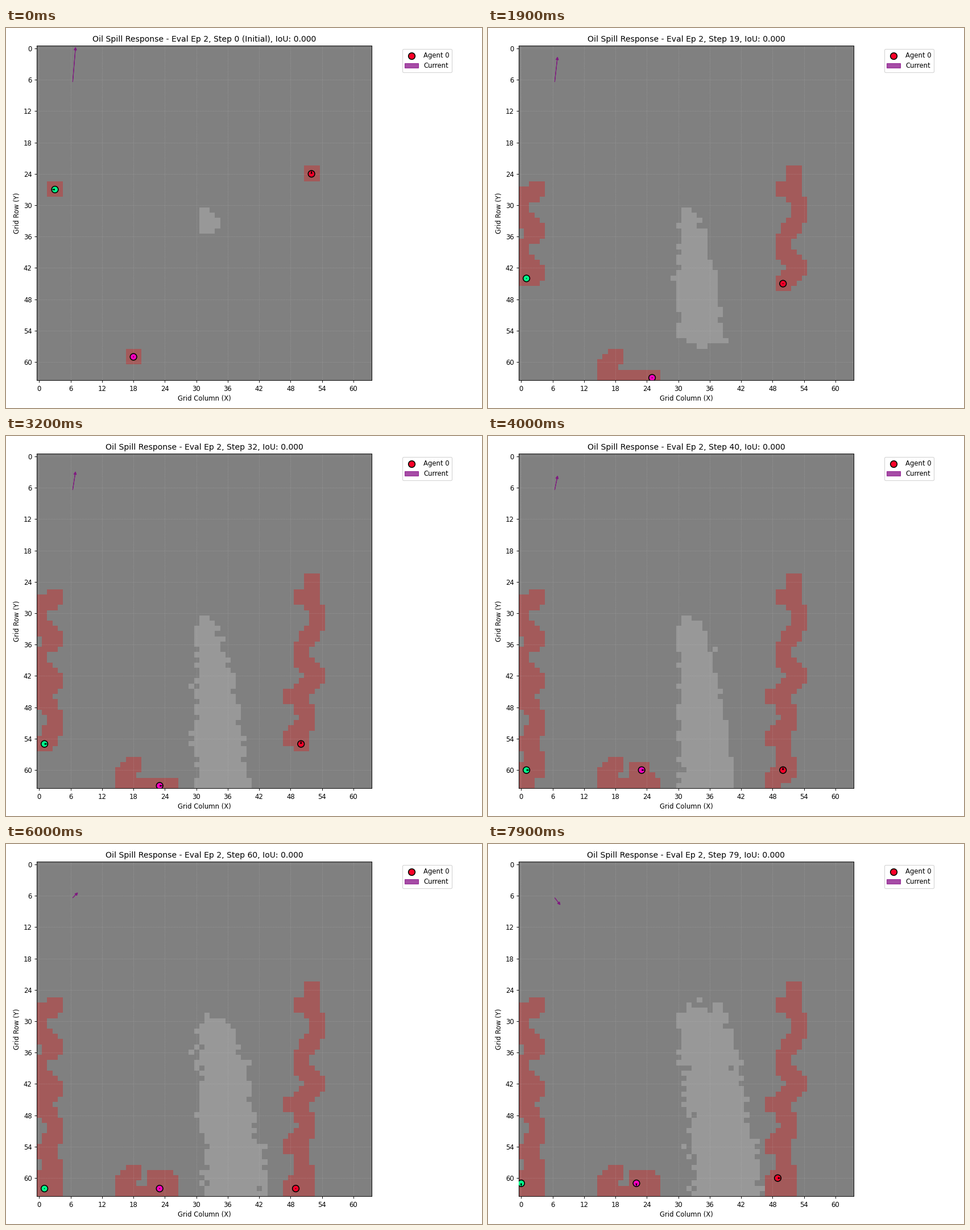
Recreate the animation shown at these times as a matplotlib script. Size 837 by 669 pixels, loop 8000 ms.

```python
import numpy as np
import matplotlib.pyplot as plt
from matplotlib.animation import FuncAnimation
from matplotlib.patches import Patch

W, H = 837, 669
DPI = W / 10
N, STEPS = 64, 80
LEFT, TOP, SIDE = 53.8, 31.2, 589.2
WATER, OIL, SEEN = (128,) * 3, (152,) * 3, (163, 90, 90)

# Turning points (step, column, row) of each agent's zigzag search
RED = [(0, 52, 24), (3, 52, 27), (5, 50, 27), (7, 53, 30), (9, 53, 32),
       (12, 50, 37), (13, 50, 39), (16, 53, 42), (19, 50, 45), (23, 48, 46),
       (25, 51, 49), (27, 51, 51), (30, 48, 54), (32, 50, 55), (36, 51, 60),
       (38, 48, 62), (40, 50, 60), (43, 51, 62)]
GREEN = [(0, 3, 27), (3, 0, 29), (6, 0, 32), (9, 3, 35), (11, 0, 38),
         (13, 0, 40), (16, 3, 43), (19, 1, 44), (25, 1, 47), (27, 3, 50),
         (28, 3, 52), (32, 1, 55), (35, 3, 58), (37, 3, 60), (38, 1, 62),
         (40, 1, 60), (43, 3, 62)]
PINK = [(0, 18, 59), (5, 16, 61), (7, 16, 63), (19, 25, 63), (29, 21, 63),
        (32, 23, 63), (34, 24, 63), (38, 22, 61), (40, 23, 60), (43, 25, 61)]


def route(turns, home, last, nxt, seed):
    """Cell per step: the search, then idling around home on the bottom edge."""
    rng = np.random.default_rng(seed)
    idle = [(t, home + rng.integers(-1, 2), 62) for t in (56, 60, 64, 72, 76)]
    rest = [(t, home, 63) for t in (52, 68)]
    keys = sorted(turns + idle + rest + [(79, *last), (80, *nxt)])
    t, x, y = np.array(keys).T
    k = np.arange(STEPS + 1)
    return np.round([np.interp(k, t, x), np.interp(k, t, y)]).astype(int).T


ROUTES = [route(RED, 49, (49, 60), (50, 60), 1),
          route(GREEN, 2, (0, 61), (0, 60), 2),
          route(PINK, 24, (22, 61), (22, 60), 3)]

row, col = np.mgrid[:N, :N]


def slick(k):
    """Oil mask: a plume that sinks, widens with depth and then leans right."""
    top = np.interp(k, [0, 52, 79], [31, 31, 28])
    bottom = 35 + 1.12 * k
    depth = np.clip((row - top) / (N - 1 - top), 0, 1)
    lean = max(0, (k - 36) / 43)
    cap = (np.exp(-np.maximum(row - top, 0) / 1.5)
           + np.exp(-np.maximum(bottom - row, 0)))
    left = 30.3 + 3.5 * lean * depth + cap
    right = 32.9 + 5.4 * lean + 7 * depth ** 0.75 - cap
    inside = np.min([col - left, right - col, row - top, bottom - row], axis=0) + 0.5
    blur = 0.15 + 0.25 * k / STEPS
    chance = 1 / (1 + np.exp(-np.clip(inside / blur, -30, 30)))
    return np.random.default_rng(k).random((N, N)) < chance


def picture(k):
    img = np.full((N, N, 3), WATER, np.uint8)
    img[slick(k)] = OIL
    for cells in ROUTES:
        for x, y in cells[:k + 1]:
            img[max(y - 1, 0):y + 2, max(x - 1, 0):x + 2] = SEEN
    return img


def heading(cells, k):
    dx, dy = cells[k + 1] - cells[k]
    return (np.sign(dx), 0) if abs(dx) >= abs(dy) else (0, np.sign(dy))


def current(k):
    return (np.interp(k, [0, 52, 68, 79], [.5, .42, .76, .72]),
            np.interp(k, [0, 52, 68, 79], [-6.08, -.98, -.22, .92]))


# The small margin keeps the pixel size from rounding down
fig = plt.figure(figsize=((W + .01) / DPI, (H + .01) / DPI), dpi=DPI,
                 facecolor="white")
ax = fig.add_axes([LEFT / W, 1 - (TOP + SIDE) / H, SIDE / W, SIDE / H])
colors = [plt.cm.gist_rainbow(v) for v in (0., .5, 1.)]

image = ax.imshow(picture(0), interpolation="nearest")
ax.set_autoscale_on(False)
ax.set_xticks(range(0, N, 6))
ax.set_yticks(range(0, N, 6))
ax.grid(color="lightgrey", ls=":", lw=0.5, alpha=0.5)
ax.set_xlabel("Grid Column (X)")
ax.set_ylabel("Grid Row (Y)")
title = ax.set_title("")

flow = ax.arrow(6.4, 6.4, *current(0), head_width=0.5, head_length=0.5,
                color="purple", alpha=0.7, zorder=4)
start = np.array([cells[0] for cells in ROUTES])
disc = dict(s=100, edgecolors="black", linewidths=1.4)
dots = ax.scatter(*start.T, c=colors, zorder=5, **disc)
needles = ax.quiver(*start.T, [0] * 3, [0] * 3, angles="uv", units="dots",
                    scale_units="dots", scale=1, width=1.8, color="black",
                    zorder=6)

ax.legend(handles=[ax.scatter([], [], color=colors[0], label="Agent 0", **disc)
                   if False else
                   ax.scatter([], [], facecolors=[colors[0]], label="Agent 0", **disc),
                   Patch(color="purple", alpha=0.7, label="Current")],
          loc="upper left", bbox_to_anchor=(1.0815, 1))


def draw(k):
    spots = np.array([cells[k] for cells in ROUTES])
    image.set_data(picture(k))
    dots.set_offsets(spots)
    needles.set_offsets(spots)
    needles.set_UVC(*6.0 * np.array([heading(cells, k) for cells in ROUTES]).T)
    dx, dy = current(k)
    flow.set_data(dx=dx, dy=dy)
    note = "" if k else " (Initial)"
    title.set_text(f"Oil Spill Response - Eval Ep 2, Step {k}{note}, IoU: 0.000")
    return image, dots, needles, flow, title


anim = FuncAnimation(fig, draw, frames=STEPS, init_func=lambda: draw(0),
                     interval=100, repeat=True, repeat_delay=0, blit=False)
plt.show()
```
